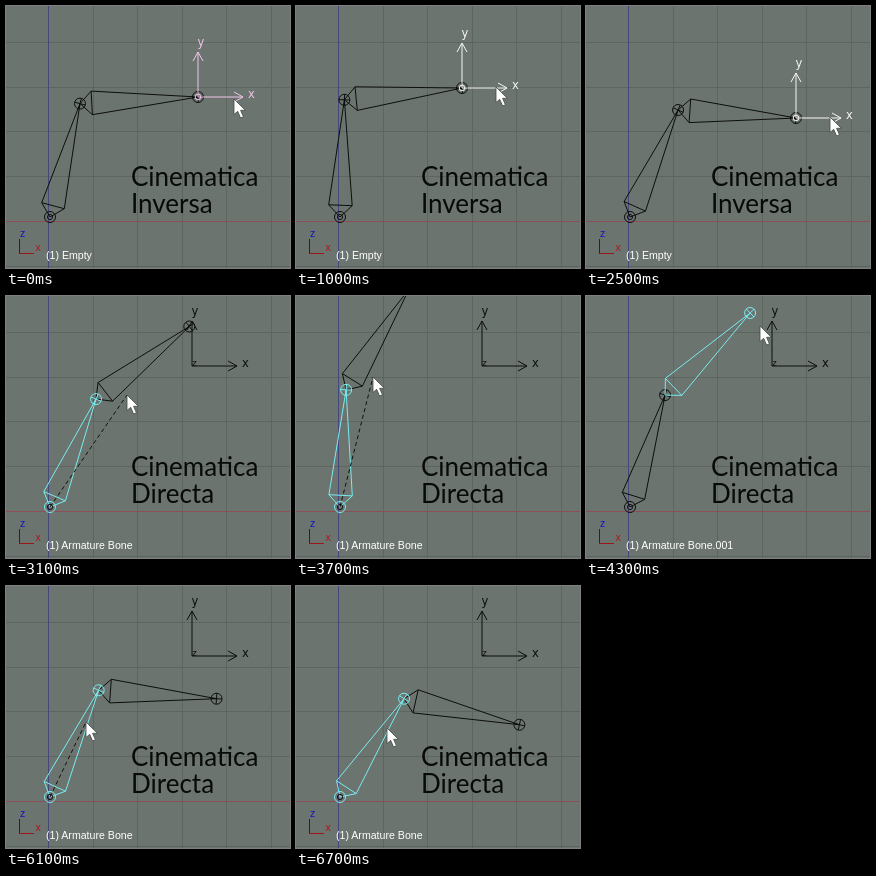
Animation of 284 by 262 pixels, one loop 7 s. Source, as an HTML page:

```html
<!DOCTYPE html>
<html lang="it">
<head>
<meta charset="utf-8">
<title>Cinematica</title>
<style>
  html, body { margin: 0; width: 100%; height: 100%; overflow: hidden; background: #6c746f; }
  svg { display: block; width: 284px; height: 262px; }
  .line { fill: none; stroke-width: 1; }
  .title { font: 26px Lato, sans-serif; fill: #080a09; }
  .small { font: 10.6px "Liberation Sans", Arial, sans-serif; }
  .axis { font: 11.5px "DejaVu Sans", sans-serif; }
</style>
</head>
<body>
<svg viewBox="0 0 284 262">
  <rect width="284" height="262" fill="#6c746f"/>
  <path id="grid" class="line" stroke="#5d6561"/>
  <path class="line" stroke="#8d4f57" d="M0 215.5H284"/>
  <path class="line" stroke="#45477a" d="M42.5 0V262"/>

  <g class="small">
    <path class="line" stroke="#1414b4" d="M13.5 233V247"/>
    <path class="line" stroke="#9c1616" d="M13 247.5H28"/>
    <text x="14" y="231" fill="#1414c4">z</text>
    <text x="29.5" y="245" fill="#b01818">x</text>
    <text id="status" x="40" y="253" fill="#fff"></text>
  </g>

  <g id="bones">
    <path id="lower" class="line"/>
    <path id="upper" class="line"/>
    <circle id="hub" r="2.6" class="line" stroke="#111"/>
  </g>
  <path id="dash" class="line" stroke="#111" stroke-dasharray="4 3"/>

  <g id="empty" class="axis">
    <path class="line" stroke="currentColor"
      d="M0 0V-45M-5 -36L0 -45L5 -36M0 0H45M36 -5L45 0L36 5"/>
    <circle id="spot" r="2.8" class="line" stroke="currentColor"/>
    <g fill="currentColor">
      <text x="-.5" y="-51">y</text>
      <text x="50" y="1">x</text>
      <text id="zmark" x="0" y="0" font-size="9">z</text>
    </g>
  </g>

  <g class="title">
    <text x="125" y="180">Cinematica</text>
    <text id="mode" x="125" y="207"></text>
  </g>

  <path id="mouse" fill="#fff" stroke="#444b48" stroke-width=".8"
    d="M0 0V15.5L3.7 12.3L6.6 19L9.4 17.8L6.6 11.3H11.3Z"/>
</svg>
<script>
const $ = id => document.getElementById(id);
const ROOT = [44, 211], L1 = 117.3, L2 = 118.2, REST = 72.6;
const RAD = Math.PI / 180, CYAN = '#78ecf0', BLACK = '#0c0e0d';

// Inverse part: where the handle is dragged
const drags = [
  [192, 91], [187, 87], [173, 78], [163, 72], [166, 82],
  [181, 109], [198, 132], [210, 151], [209, 153], [210, 112]
];

// Direct part: lower angle, bend, selected bone, mouse x, mouse y, rotating
const turns = [
  [REST, 29, 2, 109, 94, 0],
  [66.9, 29, 1, 121, 99, 1],
  [66, 29, 1, 122, 102, 1],
  [87, 29, 1, 77, 81, 1],
  [REST, 28.6, 1, 140, 62, 0],
  [REST, 28.6, 2, 174, 30, 0],
  [REST, 30.7, 2, 185, 34, 1],
  [REST, 55.8, 2, 202, 79, 1],
  [REST, 67.7, 2, 214, 118, 1],
  [REST, 69.6, 2, 206, 121, 0],
  [REST, 69.6, 1, 70, 132, 0],
  [65.5, 69.6, 1, 80, 136, 1],
  [58.5, 69.6, 1, 89, 141, 1],
  [56.9, 69.6, 1, 91, 142, 0]
];

const polar = ([x, y], r, deg) => [x + r * Math.cos(deg * RAD), y - r * Math.sin(deg * RAD)];
const pt = p => p.map(v => v.toFixed(1)).join(' ');
const move = (el, p) => el.setAttribute('transform', `translate(${pt(p)})`);
const show = (el, on) => el.setAttribute('visibility', on ? 'visible' : 'hidden');

function ring([x, y]) {
  return `M${x - 5.5} ${y}a5.5 5.5 0 1 0 11 0a5.5 5.5 0 1 0 -11 0`;
}

function cross(p, deg) {
  return [0, 90].map(a => `M${pt(polar(p, 5.5, deg + a))}L${pt(polar(p, -5.5, deg + a))}`).join('');
}

function bone(a, b, deg) {
  const len = Math.hypot(b[0] - a[0], b[1] - a[1]);
  const mid = polar(a, len * 0.1, deg);
  const l = pt(polar(mid, len * 0.1, deg + 90)), r = pt(polar(mid, len * 0.1, deg - 90));
  return `M${pt(a)}L${l}L${pt(b)}L${r}ZM${l}L${r}` + ring(b) + cross(b, deg);
}

// Angle of the lower bone that lets the chain reach a point
function reach([x, y]) {
  const dx = x - ROOT[0], dy = ROOT[1] - y, d = Math.hypot(dx, dy);
  return (Math.atan2(dy, dx) + Math.acos((d * d + L1 * L1 - L2 * L2) / (2 * d * L1))) / RAD;
}

function pose(step) {
  if (step < drags.length) {
    const tip = drags[step], a = reach(tip), joint = polar(ROOT, L1, a);
    const b = Math.atan2(joint[1] - tip[1], tip[0] - joint[0]) / RAD;
    const mouse = step ? [tip[0] + 34, tip[1] - 1] : [228, 93];
    return { a, b, joint, tip, mouse, sel: 0, empty: tip, ink: step ? '#f6f6f6' : '#f0c4e8' };
  }
  const [a, bend, sel, x, y, rotating] = turns[step - drags.length];
  const joint = polar(ROOT, L1, a), b = a - bend;
  return {
    a, b, joint, tip: polar(joint, L2, b), mouse: [x, y], sel,
    empty: [186, 70], ink: BLACK, pivot: rotating && (sel === 1 ? ROOT : joint)
  };
}

const names = ['Empty', 'Armature Bone', 'Armature Bone.001'];

function draw(step) {
  const p = pose(step), inverse = !p.sel;
  const lower = $('lower'), upper = $('upper');
  lower.setAttribute('d', ring(ROOT) + bone(ROOT, p.joint, p.a));
  upper.setAttribute('d', bone(p.joint, p.tip, p.b));
  lower.setAttribute('stroke', p.sel === 1 ? CYAN : BLACK);
  upper.setAttribute('stroke', p.sel === 2 ? CYAN : BLACK);
  if (p.sel === 1) upper.after(lower);
  else lower.after(upper);
  $('dash').setAttribute('d', p.pivot ? `M${pt(p.pivot)}L${pt(p.mouse)}` : '');
  move($('empty'), p.empty);
  $('empty').setAttribute('color', p.ink);
  show($('spot'), inverse);
  show($('zmark'), !inverse);
  move($('mouse'), p.mouse);
  $('mode').textContent = inverse ? 'Inversa' : 'Directa';
  $('status').textContent = '(1) ' + names[p.sel];
}

let grid = '';
for (let i = 0; i < 6; i++) {
  grid += `M${Math.round(42 + i * 44.6) + .5} 0V262M0 ${Math.round(36 + i * 44.7) + .5}H284`;
}
$('grid').setAttribute('d', grid);
move($('hub'), ROOT);

let start = null, last = -1;
function tick(now) {
  if (start === null) start = now;
  const t = (now - start) % 7000;
  const step = t < 100 ? 0 : 1 + Math.floor((t - 100) / 300);
  if (step !== last) draw(last = step);
  requestAnimationFrame(tick);
}
draw(0);
requestAnimationFrame(tick);
</script>
</body>
</html>
```
